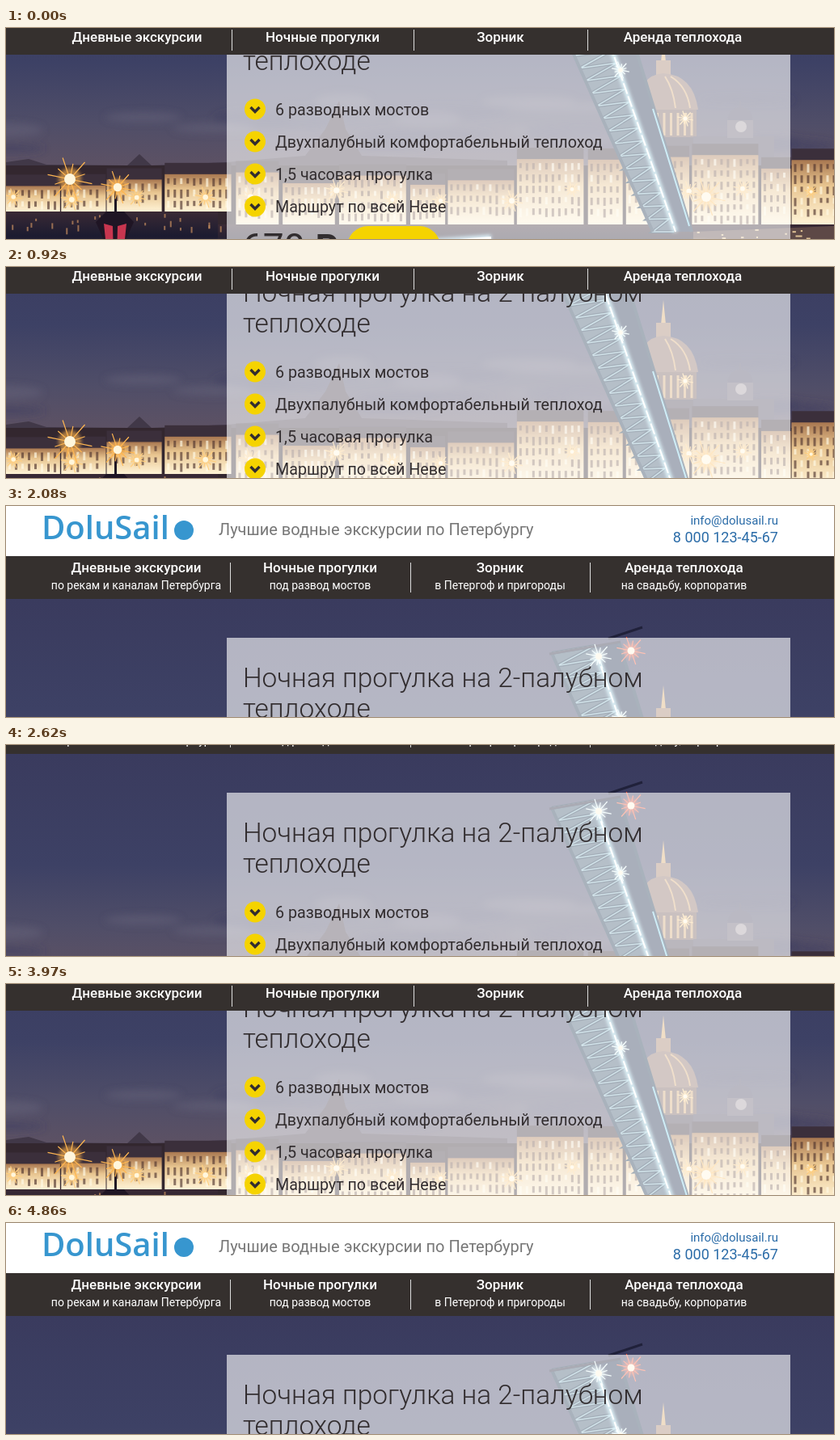
An HTML page that plays this animation: 1024x261 px, repeating every 5.58 s.

```html
<!DOCTYPE html>
<html lang="ru">
<head>
<meta charset="utf-8">
<title>Прогулки по Неве</title>
<style>
  html, body { margin: 0; width: 100%; height: 100%; overflow: hidden; background: #fff; }
  svg { display: block; width: 1024px; height: 261px; font-family: Roboto, "Open Sans", "Noto Sans", sans-serif; }
  .bar { fill: #35302e; }
  .menu { fill: #fff; text-anchor: middle; font-size: 17px; font-weight: 500; }
  .menu .sub { font-size: 14px; font-weight: 400; }
  .logo { font: 600 40px "Open Sans", "Noto Sans", sans-serif; }
  .blue { fill: #3796cf; }
  .tag { font-size: 20px; fill: #777; }
  .contact { fill: #2b6ca8; text-anchor: end; }
  .panel { fill: #322d2f; font-size: 19.7px; }
  .title { font-size: 33.4px; font-weight: 300; }
</style>
</head>
<body>
<svg viewBox="0 0 1024 261">
  <defs>
    <linearGradient id="sky" x2="0" y2="1">
      <stop offset="0" stop-color="#3a3b5e"/>
      <stop offset=".5" stop-color="#3d4165"/>
      <stop offset=".78" stop-color="#504e68"/>
      <stop offset="1" stop-color="#5f5263"/>
    </linearGradient>
    <linearGradient id="wall" x2="0" y2="1">
      <stop offset="0" stop-color="#a87750"/>
      <stop offset=".4" stop-color="#e8c590"/>
      <stop offset="1" stop-color="#fff3d6"/>
    </linearGradient>
    <linearGradient id="river" x2="0" y2="1">
      <stop offset="0" stop-color="#3a2a35"/>
      <stop offset=".2" stop-color="#1c1b30"/>
      <stop offset=".5" stop-color="#4a3638"/>
    </linearGradient>
    <filter id="soft" x="-20%" y="-50%" width="140%" height="200%"><feGaussianBlur stdDeviation="2"/></filter>
    <filter id="cloud" x="-20%" y="-100%" width="140%" height="300%"><feGaussianBlur stdDeviation="5"/></filter>
  </defs>

  <g id="page">
    <g id="photo"></g>

    <rect x="273" y="163" width="697" height="420" fill="#fff" opacity=".62"/>
    <g class="panel">
      <text class="title" x="293" y="224">Ночная прогулка на 2-палубном</text>
      <text class="title" x="293" y="262">теплоходе</text>
      <g id="list"></g>
      <text x="292" y="497" font-size="46">670</text>
      <text x="380" y="497" font-size="44" font-weight="700">₽</text>
      <text x="293" y="519" font-size="13">750 ₽ на причале</text>
      <rect x="422" y="455" width="115" height="51" rx="25.5" fill="#f5d300"/>
      <text x="480" y="486" text-anchor="middle">Купить</text>
      <text x="558" y="488" font-size="22.2" fill="#3883bd">Подробнее об экскурсии</text>
      <path d="M822 481h14m-5-5 5 5-5 5" fill="none" stroke="#3883bd" stroke-width="1.8"/>
    </g>

    <rect y="-80" width="1024" height="142" fill="#fff"/>
    <text class="logo blue" x="44" y="41">DoluSail</text>
    <circle class="blue" cx="220" cy="30" r="12"/>
    <text class="tag" x="263" y="36">Лучшие водные экскурсии по Петербургу</text>
    <text class="contact" x="955" y="23" font-size="15">info@dolusail.ru</text>
    <text class="contact" x="955" y="45" font-size="18">8 000 123-45-67</text>
    <rect class="bar" y="62" width="1024" height="53"/>
    <g class="menu" id="menu"></g>
  </g>

  <g id="sticky">
    <rect class="bar" width="1024" height="33"/>
    <g class="menu" id="stickyMenu"></g>
  </g>
</svg>

<script>
const byId = id => document.getElementById(id);
const fill = (id, html) => { byId(id).innerHTML = html; };
const repeat = (n, f) => Array.from({ length: n }, (_, i) => f(i)).join('');

let seed = 7;
const rnd = (a, b) => {
  seed = seed * 16807 % 2147483647;
  return a + (b - a) * seed / 2147483647;
};

// Menus
const titles = ['Дневные экскурсии', 'Ночные прогулки', 'Зорник', 'Аренда теплохода'];
const subs = ['по рекам и каналам Петербурга', 'под развод мостов', 'в Петергоф и пригороды', 'на свадьбу, корпоратив'];
const label = (xs, y, words, cls = '') =>
  words.map((w, i) => `<text class="${cls}" x="${xs[i]}" y="${y}">${w}</text>`).join('');
const dividers = (xs, y, h) =>
  xs.map(x => `<rect x="${x}" y="${y}" width="1" height="${h}" fill="#ddd"/>`).join('');
const centers = [161, 388.5, 611, 838.5];
fill('menu', label(centers, 82, titles) + label(centers, 103, subs, 'sub') + dividers([277, 500, 722], 70, 37));
fill('stickyMenu', label([162, 391.5, 611.5, 837], 17, titles) + dividers([279, 504, 719], 2, 26));

// Feature list
const features = ['6 разводных мостов', 'Двухпалубный комфортабельный теплоход', '1,5 часовая прогулка', 'Маршрут по всей Неве'];
fill('list', features.map((text, i) => {
  const y = 311 + 40 * i;
  return `<circle cx="308" cy="${y - .5}" r="13" fill="#f5d300"/>
    <path d="M302.5 ${y - 3}l5.5 5.5 5.5-5.5" fill="none" stroke="#322d2f" stroke-width="3.4"/>
    <text x="333" y="${y + 7}">${text}</text>`;
}).join(''));

// Night city
const rect = (x, y, w, h, color, extra = '') =>
  `<rect x="${x}" y="${y}" width="${w}" height="${h}" fill="${color}" ${extra}/>`;
const path = (d, color, width, extra = '') =>
  `<path d="${d}" fill="none" stroke="${color}" stroke-width="${width}" ${extra}/>`;
const shape = (d, color) => `<path d="${d}" fill="${color}"/>`;

function star(x, y, r, color) {
  const rays = repeat(12, i => {
    const a = i * Math.PI / 6 + .2, len = r * (i % 2 ? .7 : 1);
    return `M${x} ${y}l${len * Math.cos(a)} ${len * Math.sin(a)}`;
  });
  return `<circle cx="${x}" cy="${y}" r="${r * .5}" fill="${color}" opacity=".6" filter="url(#soft)"/>`
    + path(rays, color, 1.2)
    + `<circle cx="${x}" cy="${y}" r="${r * .25}" fill="#fff6dc"/>`;
}

function clouds() {
  return '<g filter="url(#cloud)">' + repeat(24, () =>
    `<ellipse cx="${rnd(0, 1024)}" cy="${rnd(290, 365)}" rx="${rnd(30, 90)}" ry="${rnd(4, 10)}"
      fill="${rnd(0, 1) < .5 ? '#67627a' : '#3d3f60'}" opacity=".5"/>`) + '</g>';
}

function building(x, y, w, bottom) {
  const windows = repeat(Math.floor(w / 8), c => repeat(Math.floor((bottom - y) / 14), r =>
    rect(x + 3 + c * 8, y + 5 + r * 14, 3, rnd(6, 11), rnd(0, 1) < .75 ? '#50352f' : '#fffae6', 'opacity=".65"')));
  return rect(x, y - 14, w, 15, '#3b2f3b') + rect(x, y, w, bottom - y, 'url(#wall)') + windows;
}

// The far bank rises to the right and is lower behind the near bridge.
function city() {
  let out = rect(0, 380, 1024, 75, '#33272f');
  for (let x = 0, w; x < 1024; x += w + rnd(0, 6)) {
    w = rnd(35, 85);
    const top = (x < 600 ? 397 : 376) + rnd(-10, 10);
    out += building(x, top, w, x < 240 ? 437 : 453);
  }
  return out;
}

function lamps() {
  const small = repeat(14, i => star(20 + i * 75 + rnd(-20, 20), rnd(408, 424), rnd(8, 15), '#ffcf80'));
  return small + star(79, 397, 28, '#ffb650') + star(138, 407, 21, '#ffb650') + star(866, 419, 24, '#ffc060');
}

function cathedral() {
  return shape('M809 262L813 222L817 262Z', '#d9a86c')
    + rect(804, 250, 18, 20, '#a07c66')
    + shape('M780 311Q782 268 813 266Q850 268 856 311Z', '#8b7068')
    + path('M822 270Q842 282 846 309M815 270Q825 285 828 309', '#d8ab78', 2)
    + rect(784, 311, 70, 34, '#735c5a')
    + repeat(8, i => rect(787 + i * 8.5, 315, 3, 28, '#d3a878'))
    + rect(762, 345, 125, 40, '#4a4153')
    + star(840, 322, 10, '#ffd68a');
}

function tower() {
  return rect(850, 344, 100, 40, '#504a5e')
    + rect(892, 322, 32, 24, '#655d6e')
    + shape('M892 324Q894 308 908 308Q922 308 924 324Z', '#4a4862')
    + rect(907, 300, 2, 9, '#4a4862')
    + '<circle cx="909" cy="332" r="7" fill="#a39aa2"/>';
}

function bridge() {
  const left = k => [675 + 125 * k, 182 + 280 * k];
  const mid = k => [728 + 98 * k, 173 + 289 * k];
  const truss = repeat(18, i => {
    const a = i / 18, b = (i + 1) / 18;
    return `M${left(a)}L${mid(a)}L${left(b)}L${mid(b)}`;
  });
  return shape('M675 182L758 168L848 462L800 462Z', '#1d2c4c')
    + shape('M675 182L728 173L826 462L800 462Z', '#3d5670')
    + path(truss, '#0f2a45', 4) + path(truss, '#86b4c6', 1.5)
    + path('M675 182L800 462M758 168L848 462', '#1c3550', 4)
    + path('M730 182L828 462', '#aee6f5', 6, 'filter="url(#soft)"')
    + path('M730 182L828 462', '#fff', 2, 'stroke-dasharray="14 3"')
    + path('M800 310L845 455', '#7fd0ea', 2)
    + path('M672 183L760 168M745 164L787 150', '#20213a', 3)
    + star(733, 186, 16, '#eaffff') + star(760, 262, 11, '#eaffff')
    + star(773, 179, 18, '#ff5c38');
}

function embankment() {
  const trail = 'M0 480Q60 483 113 498M154 498Q210 480 273 479Q420 485 600 470';
  return rect(0, 437, 262, 150, 'url(#river)') + rect(262, 453, 762, 134, 'url(#river)')
    + path(trail, '#9fd0e8', 9, 'filter="url(#soft)"') + path(trail, '#fff', 4)
    + repeat(70, i => rect(i * 15 + rnd(0, 9), rnd(496, 520), rnd(2, 6), rnd(2, 6), '#d8b088', 'opacity=".7"'))
    + repeat(22, () => rect(rnd(0, 270), rnd(440, 458), 2, rnd(3, 8), '#c88f60', 'opacity=".7"'))
    + shape('M115 520L120 470L111 450L124 437L146 437L158 450L149 470L155 520Z', '#1f1524')
    + shape('M121 452L132 455L133 495L125 490ZM149 452L138 455L137 495L145 490Z', '#c8364f')
    + rect(134, 405, 3, 45, '#1f1524')
    + shape('M850 462L1024 455V580H850Z', '#5d4846')
    + repeat(45, () => rect(rnd(852, 1022), rnd(458, 520), rnd(2, 5), 2, '#ffe0a8', 'opacity=".8"'))
    + path('M850 475Q930 478 1024 496', '#ffedcd', 4, 'filter="url(#soft)"');
}

fill('photo',
  rect(0, 115, 1024, 275, 'url(#sky)') + clouds()
  + shape('M0 390V376L28 372L50 379L150 380L165 366L180 380L273 376L370 368L395 335L412 300L420 335L440 368L620 374V390Z', '#413848')
  + cathedral() + tower() + city() + embankment() + lamps() + bridge());

// Each glide moves the scroll through [step, position] points, slow at both ends.
const LOOP = 5580, STEP = 89, STICK_AT = 112, MENU_HEIGHT = 53;
const BOTTOM = 204;
const glides = [
  { start: 120, points: [[0, 157], [2, BOTTOM]] },
  { start: 560, points: [[0, BOTTOM], [5, 128], [12, 30], [14, 0]] },
  { start: 2350, points: [[0, 0], [4, 104], [11, BOTTOM]] },
  { start: 3520, points: [[0, BOTTOM], [6, 130], [12, 0]] }
];

function scrollAt(t) {
  const { start, points } = glides.findLast(g => g.start <= t) || glides[0];
  const last = points.length - 1;
  const step = Math.min(Math.max(Math.floor((t - start) / STEP) + 1, 0), points[last][0]);
  const i = points.findIndex(([s], n) => n > 0 && step <= s);
  const [s0, y0] = points[i - 1], [s1, y1] = points[i];
  let p = (step - s0) / (s1 - s0);
  if (i === last) p = 1 - (1 - p) ** 1.5;
  else if (i === 1) p **= 1.5;
  return Math.round(y0 + (y1 - y0) * p);
}

function draw() {
  const t = performance.now() % LOOP;
  const y = scrollAt(t);
  const stuck = y > STICK_AT;
  // A stuck menu leaves the flow, so the content moves up by its height.
  byId('page').setAttribute('transform', `translate(0 ${-y - (stuck ? MENU_HEIGHT : 0)})`);
  byId('sticky').setAttribute('visibility', stuck ? 'visible' : 'hidden');
  requestAnimationFrame(draw);
}
draw();
</script>
</body>
</html>
```
